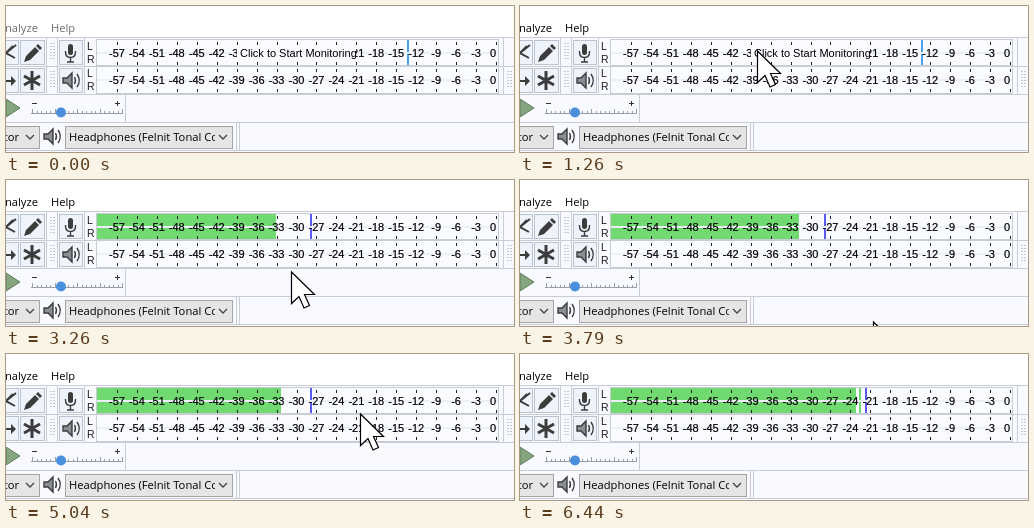
Recreate the animation shown at these times as an HTML page. Size 508x146 px, loop 6.56 s.

```html
<!DOCTYPE html>
<html lang="en">
<head>
<meta charset="utf-8">
<title>Input level meter</title>
<style>
html, body { margin: 0; width: 100%; height: 100%; overflow: hidden; background: #fff; }
svg { display: block; width: 508px; height: 146px; }
.ui { font: 11.2px "Open Sans", sans-serif; }
.num { font: 11px "Liberation Sans", Arial, sans-serif; text-anchor: middle; stroke: #000; stroke-width: .2; }
.tip { font: 11px "Liberation Sans", Arial, sans-serif; }
.ch { font: 10.5px "Liberation Sans", Arial, sans-serif; fill: #222; }
.rule { stroke: #c9ccd4; fill: none; shape-rendering: crispEdges; }
.btn { fill: #eff3fb; stroke: #bcc3d0; shape-rendering: crispEdges; }
.combo { fill: #e5e5e5; stroke: #a4a4a4; shape-rendering: crispEdges; }
.icon { fill: none; stroke: #3c3c3c; stroke-width: 2; }
.thin { stroke-width: 1.4; }
.bold { stroke-width: 3; }
.solid { fill: #3c3c3c; }
</style>
</head>
<body>
<svg viewBox="0 0 508 146">
  <defs>
    <g id="speaker">
      <path class="icon thin" style="fill:#8a8d93" d="M1 6h4l5-5v15l-5-5H1z"/>
      <path class="icon thin" d="M12.5 5q2 3.5 0 7M15 2q4.5 6.5 0 13"/>
    </g>
    <path id="grip" d="M0 0v18M3 0v18" stroke="#c4c8d0" stroke-width="2" stroke-dasharray="1 2" shape-rendering="crispEdges"/>
    <path id="chevron" d="M-4 -2L0 2L4 -2" fill="none" stroke="#444" stroke-width="1.3"/>
    <clipPath id="field"><path d="M60 120h149v22H60z"/></clipPath>
  </defs>

  <path fill="#fff" d="M0 0h508v31H0z"/>
  <path fill="#f8faff" d="M0 31h508v115H0z"/>
  <g class="ui" id="menu">
    <text x="32" y="26" text-anchor="end">Analyze</text>
    <text x="45" y="26">Help</text>
  </g>

  <path class="rule" d="M0 31.5H508M0 60.5H508M0 88.5H508M0 116.5H508M0 144.5H508
    M40.5 32V88M51.5 32V88M78.5 32V88M497.5 32V88M119.5 89V116M230.5 117V144M233.5 117V144"/>
  <path class="btn" d="M-1 34.5H12.5V58.5H-1zM14.5 34.5h24v24h-24zM-1 62.5H12.5V86.5H-1zM14.5 62.5h24v24h-24z
    M53.5 34.5h23v24h-23zM53.5 62.5h23v24h-23z"/>
  <use href="#grip" x="45" y="37"/>
  <use href="#grip" x="45" y="65"/>
  <use href="#grip" x="502" y="65"/>

  <path class="icon" d="M10 39L0 47L9 52M0 47L7 40M0 75H7"/>
  <path class="solid" d="M5 70l5 5-5 5zM18 56l2-6 9-9 4 4-9 9zM30 40l2-2 4 4-2 2z"/>
  <path class="icon bold" d="M26 65V84M18 70l16 9M34 70l-16 9"/>
  <rect class="solid" x="62" y="38" width="5" height="11" rx="2.5"/>
  <path class="icon thin" d="M59.5 45v1q0 5.5 5 5.5t5-5.5v-1M64.5 52v4M61 56h7"/>
  <use href="#speaker" x="56" y="66"/>
  <path d="M0 93L14 102L0 111z" fill="#84a57e" stroke="#5f7a5a"/>

  <path d="M26 97.5h5M109 97.5h5M111.5 95v5" stroke="#333" shape-rendering="crispEdges"/>
  <path id="notches" d="M25 107.5H117" stroke="#9a9ea6" shape-rendering="crispEdges"/>
  <circle cx="55" cy="106.5" r="5" fill="#4a8fdc"/>

  <path class="combo" d="M-1 120.5H33.5V142.5H-1zM59.5 120.5H226.5V142.5H59.5z"/>
  <use href="#chevron" x="24" y="131"/>
  <use href="#chevron" x="217" y="131"/>
  <use href="#speaker" x="37" y="122"/>
  <g class="ui">
    <text x="13" y="135" text-anchor="end">tor</text>
    <text x="63" y="135" clip-path="url(#field)">Headphones (Felnit Tonal Codec)</text>
  </g>

  <path fill="#fafbff" d="M91 34H492V59H91zM91 61H492V87H91z"/>
  <g shape-rendering="crispEdges">
    <rect id="level" x="91" y="34" height="25" fill="#70d970"/>
    <rect id="hold" y="34" width="2" height="25" fill="#70d970"/>
    <rect id="peak" y="34" width="2" height="25"/>
    <path fill="#eceff5" d="M91 46H492v2H91zM91 73H492v2H91z"/>
  </g>
  <path class="rule" d="M90.5 33.5H492.5V59.5H90.5zM90.5 60.5H492.5V87.5H90.5z"/>
  <g id="scale"></g>
  <g id="prompt">
    <path fill="#fafbff" d="M231 39H350V56H231z"/>
    <text class="tip" x="234" y="51">Click to Start Monitoring</text>
  </g>

  <path id="cursor" d="M.5 1V32.5L8 25.5L13 37L18.5 34.5L13.5 23.5H23.5z" fill="#fff" stroke="#000" stroke-width="1.2"/>
</svg>
<script>
const $ = id => document.getElementById(id);
const LOOP = 6560, FOCUS = 1260, START = 1400, SAMPLE = 112;
const LEFT = 91, DB = 6.65;

// loud moments: the bar falls back from them, the peak mark stays
const hits = [{ time: START, x: 304 }, { time: START + 44 * SAMPLE, x: 345 }];

// pointer strokes: quadratic curves, eased between start and end
const glides = [
  { start: 310, end: 890, path: [[396, 104], [300, -12], [237, 44]] },
  { start: 2300, end: 2840, path: [[237, 44], [229, 86], [285, 91]] },
  { start: 3260, end: 3900, path: [[285, 91], [360, 100], [352, 148]] },
  { start: 5040, end: 5510, path: [[354, 59], [345, 38], [319, 40]] },
  { start: 5640, end: 5960, path: [[319, 40], [319, 50], [321, 72]] }
];
const GONE = glides.at(-1).end;

const ease = u => u * u * (3 - 2 * u);

function show(id, on, attrs = {}) {
  $(id).style.display = on ? "" : "none";
  for (const key in attrs) $(id).setAttribute(key, attrs[key]);
}

function buildScale() {
  let marks = "";
  for (const top of [34, 61]) {
    for (let db = -57; db <= 0; db += 3) {
      const x = LEFT + (db + 60) * DB, tick = Math.round(x) + .5;
      marks += `<path d="M${tick} ${top + 2}v3M${tick} ${top + 22}v3" stroke="#222" shape-rendering="crispEdges"/>`
        + `<text class="num" x="${db ? x : 487}" y="${top + 17}">${db}</text>`;
    }
    marks += `<text class="ch" x="81" y="${top + 10}">L</text><text class="ch" x="81" y="${top + 23}">R</text>`;
  }
  $("scale").innerHTML = marks;

  let notches = $("notches").getAttribute("d");
  for (let i = 0; i <= 20; i++) {
    notches += `M${Math.round(26 + i * 4.5) + .5} ${i % 5 ? 105 : 103}V107`;
  }
  $("notches").setAttribute("d", notches);
}

function drawMeter(t) {
  const live = t >= START;
  const k = Math.floor((t - START) / SAMPLE);
  const time = START + k * SAMPLE;
  const hit = hits.findLast(h => h.time <= time);
  const wave = Math.sin(4.283 * k + 4.456);
  const fall = live ? hit.x - 9 * (time - hit.time) / SAMPLE : 0;
  const edge = Math.round(Math.max(277 + 11 * wave, fall));

  show("level", live, { width: edge - LEFT });
  show("hold", live && wave > .6, { x: edge + Math.round(4 * wave) });
  show("peak", true, { x: live ? hit.x : 401, fill: live ? "#5a5af0" : "#4b9fe6" });
}

function drawCursor(t) {
  const glide = glides.findLast(g => g.start <= t);
  const shown = glide && t < GONE;
  show("cursor", shown);
  if (!shown) return;
  const u = ease(Math.min(1, (t - glide.start) / (glide.end - glide.start)));
  const [a, b, c] = glide.path;
  const [x, y] = a.map((p, i) =>
    Math.round((1 - u) ** 2 * p + 2 * u * (1 - u) * b[i] + u * u * c[i]));
  show("cursor", true, { transform: `translate(${x} ${y})` });
}

function frame() {
  const t = performance.now() % LOOP;
  drawMeter(t);
  drawCursor(t);
  show("prompt", t < START);
  show("menu", true, { fill: t < FOCUS ? "#6d6d6d" : "#000" });
  requestAnimationFrame(frame);
}

buildScale();
frame();
</script>
</body>
</html>
```
